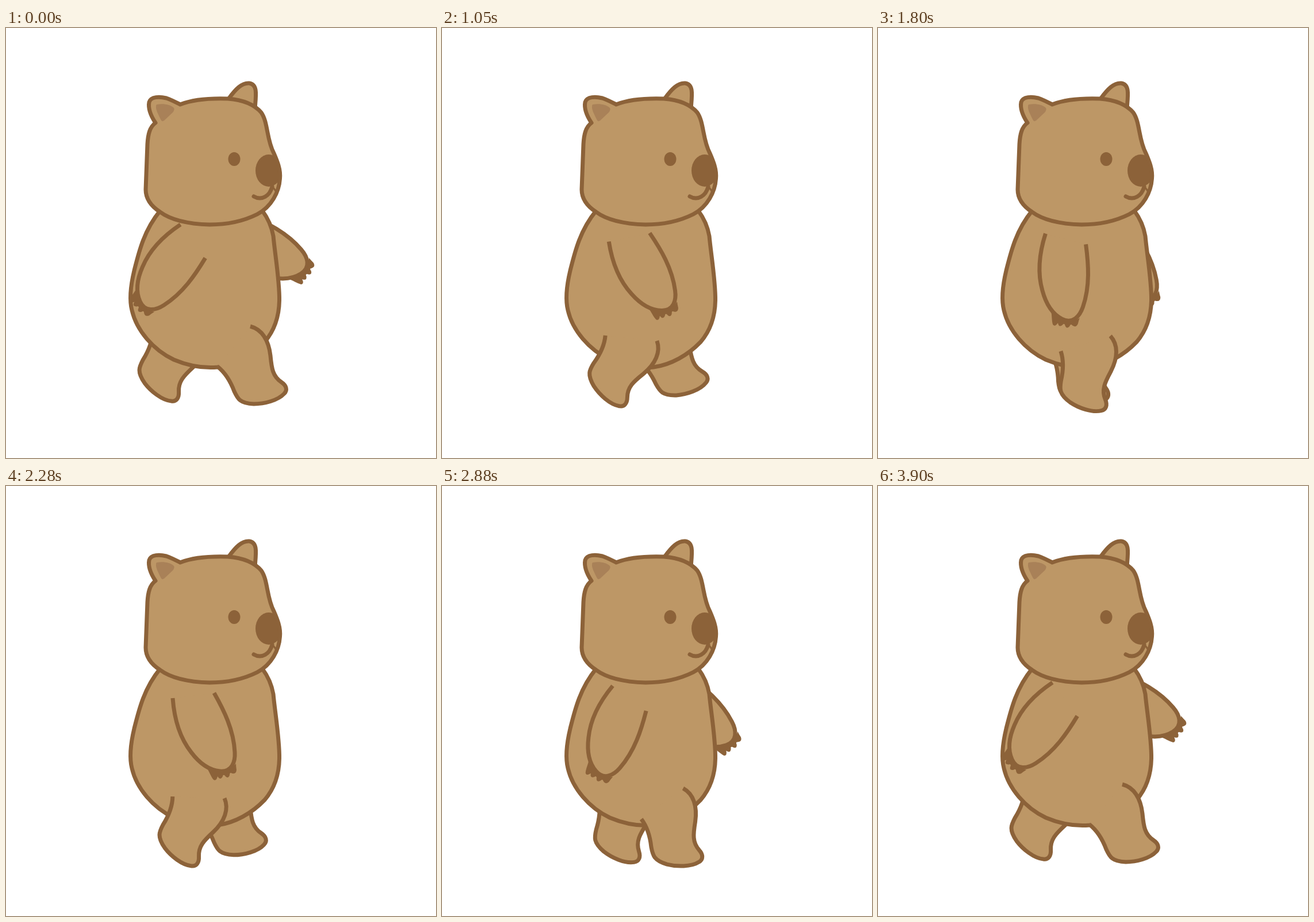
Animation of 748x748 px, one loop 4.2 s. Source, as an HTML page with a canvas:

```html
<!DOCTYPE html>
<html lang="en">
<head>
<meta charset="utf-8">
<title>Walking bear</title>
<style>
html, body { margin: 0; width: 100%; height: 100%; overflow: hidden; background: #fff; }
canvas { display: block; }
</style>
</head>
<body>
<canvas id="stage" width="748" height="748"></canvas>
<script>
const ctx = document.getElementById('stage').getContext('2d');
const FUR = '#bd9766', LINE = '#8c6239', INNER_EAR = '#a98158';
const LOOP = 4200, STEP = 30, WALK_START = 300, WALK_END = 3900, STRIDE = 1200;

const body = new Path2D(`M268 318 C240 352 231 390 223 422 C217 447 214 471 219 491
  C227 526 256 560 292 577 C318 588 345 592 368 590 C398 586 428 569 450 546
  C468 525 475 502 475.5 474 C476 440 468 395 465 362 C462 345 455 330 446 318`);
const head = new Path2D(`M303 133 C326 124 356 122 386 123 C412 125 432 133 444 147
  C456 164 453 194 466 218 C472 232 478 246 476.5 262 C475 285 462 311 437 324
  C413 336 384 342 354 342 C318 341 287 334 268 320 C251 309 243 297 243 281
  C244 252 245 225 246 202 C247 185 250 172 260 165
  C252 153 247 140 249 129 C252 119 267 119 279 122 C290 126 297 130 303 133 Z`);
const rightEar = new Path2D('M388 122 C399 107 410 95 423 96 C438 98 435 116 433 140');
const innerEar = new Path2D('M263 133 C275 131 287 134 292 139 Q294 142 290 147 L275 161 Q271 164 269 159 C265 150 260 142 261 136 Q261 133 263 133');
const mouth = new Path2D('M431 293 C445 301 459 292 463 276');
const lip = new Path2D('M463 275 L471 286');

const arm = {
  shape: new Path2D(`M290 369 C293 410 304 440 322 463 C334 479 350 494 372 496
    C393 498 399 480 398 463 C396 424 379 390 362 360`),
  claws: new Path2D(`M349 490 C354 497 356 505 361 511 Q366 514 368 505 Q373 513 377 505
    Q377 502 380 503 Q386 511 389 503 Q389 499 391 499 Q400 503 401 494 Q400 488 400 483
    Q390 496 375 496 Q360 496 349 490`)
};
const leg = {
  shape: new Path2D(`M425 519 C445 524 457 543 460 570 C462 592 464 606 479 616
    C488 622 490 630 484 636 C473 648 449 654 431 654 C407 653 403 645 397 632
    C391 616 382 600 368 589`)
};

// Each limb turns about a joint that glides in a straight line:
// joint = point in the drawing, from = its place on stage, by = glide, turn = [start, change].
const farArm = { ...arm, joint: [326, 372], from: [401, 357], by: [0, 0], turn: [-37.5, 60] };
const nearArm = { ...arm, joint: [320, 367], from: [320, 367], by: [0, 0], turn: [60.6, -77.3] };
const farLeg = { ...leg, joint: [388, 521], from: [321, 503], by: [40.5, 7.5], turn: [52.7, -67.3] };
const nearLeg = { ...leg, joint: [348, 548], from: [348, 548], by: [-48, -62], turn: [0, 67.3] };

function fill(path, color) {
  ctx.fillStyle = color;
  ctx.fill(path);
}

function outline(path, width = 7) {
  ctx.lineWidth = width;
  ctx.stroke(path);
}

function part(path) {
  fill(path, FUR);
  outline(path);
}

function drawLimb({ shape, claws, joint, from, by, turn }, swing) {
  ctx.save();
  ctx.translate(from[0] + by[0] * swing, from[1] + by[1] * swing);
  ctx.rotate((turn[0] + turn[1] * swing) * Math.PI / 180);
  ctx.translate(-joint[0], -joint[1]);
  part(shape);
  if (claws) fill(claws, LINE);
  ctx.restore();
}

function ellipse(x, y, rx, ry) {
  ctx.fillStyle = LINE;
  ctx.beginPath();
  ctx.ellipse(x, y, rx, ry, 0, 0, Math.PI * 2);
  ctx.fill();
}

function drawHead() {
  part(rightEar);
  fill(head, FUR);
  fill(innerEar, INNER_EAR);
  ctx.save();
  ctx.clip(head);
  ellipse(457, 248, 23, 28);
  outline(lip, 3);
  ctx.restore();
  outline(head);
  ellipse(397, 228, 10.5, 12);
  ctx.lineCap = 'round';
  outline(mouth);
  ctx.lineCap = 'butt';
}

// 0 at one end of the stride, 1 at the other, eased both ways.
function swingAt(time) {
  const t = Math.floor(time % LOOP / STEP) * STEP;
  if (t < WALK_START || t >= WALK_END) return 0;
  const p = 1 - Math.abs(1 - (t - WALK_START) % STRIDE / (STRIDE / 2));
  return p * p * (3 - 2 * p);
}

function draw(time) {
  const swing = swingAt(time);
  ctx.fillStyle = '#fff';
  ctx.fillRect(0, 0, 748, 748);
  ctx.strokeStyle = LINE;
  ctx.lineJoin = 'round';
  drawLimb(farArm, swing);
  drawLimb(farLeg, swing);
  part(body);
  drawLimb(nearLeg, swing);
  drawLimb(nearArm, swing);
  drawHead();
}

function tick(now) {
  draw(now);
  requestAnimationFrame(tick);
}

draw(0);
requestAnimationFrame(tick);
</script>
</body>
</html>
```
